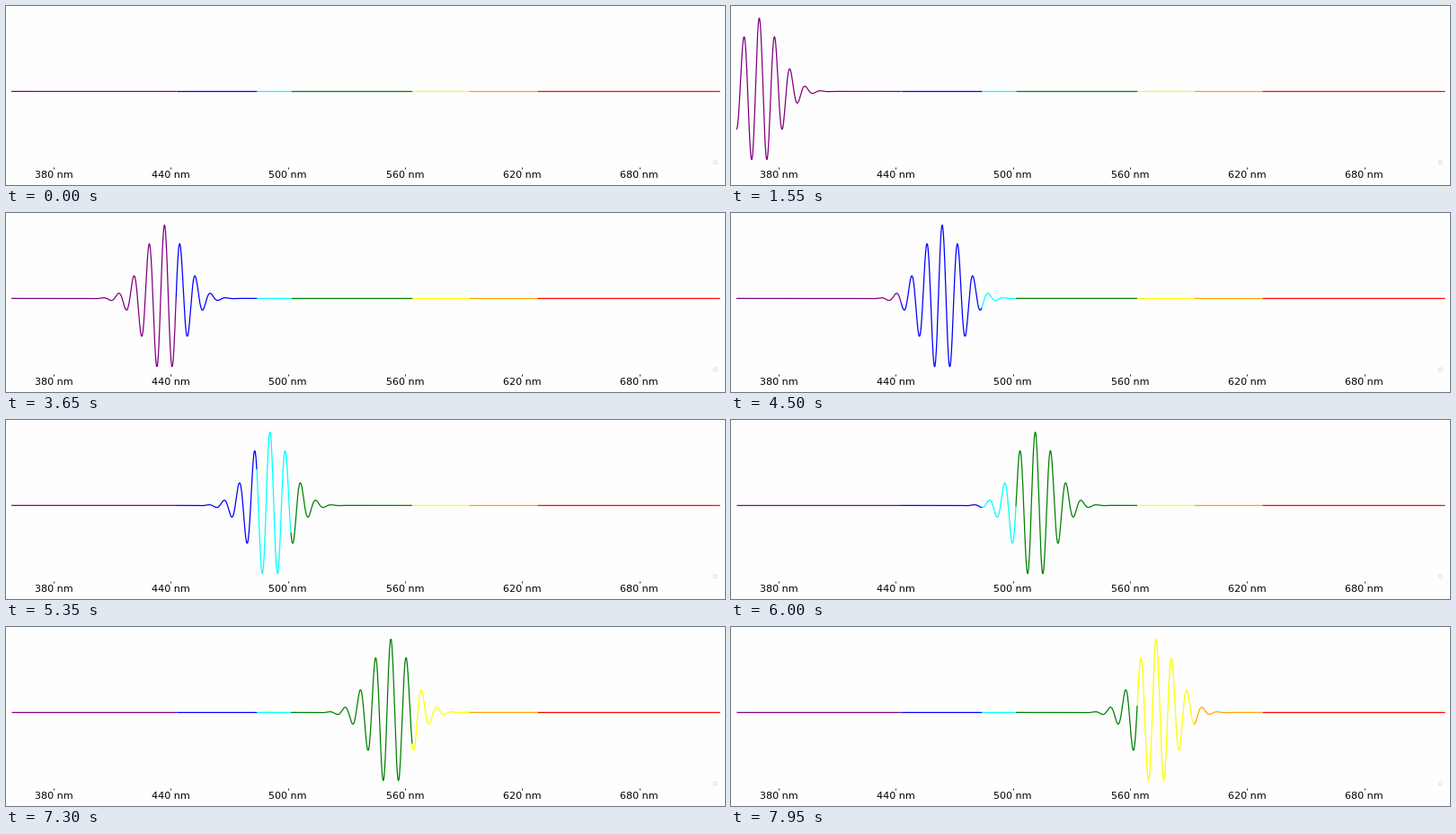
These frames come from a looping animation (800x200 px, 8 s). A matplotlib script:

```python
import numpy as np
import matplotlib.pyplot as plt
from matplotlib.animation import FuncAnimation
from matplotlib.patches import FancyBboxPatch

W, H, DPI = 800, 200, 100
FRAMES, INTERVAL = 160, 50

BASE, AMP = 95.45, 82.0       # rest line and peak height, px
PERIOD, SIGMA = 17.15, 22.2   # carrier period and envelope width, px
START, SPEED = -75.5, 3.45    # packet centre at time zero, px per frame

BANDS = [
    ("purple", 6, 189.2),
    ("blue", 189.2, 279),
    ("cyan", 279, 317),
    ("green", 317, 452),
    ("yellow", 452, 515),
    ("orange", 515, 591),
    ("red", 591, 794),
]


def packet(x, frame):
    d = x - (START + SPEED * frame)
    return BASE - AMP * np.exp(-d**2 / (2 * SIGMA**2)) * np.cos(2 * np.pi * d / PERIOD)


fig = plt.figure(figsize=(W / DPI, H / DPI), dpi=DPI, facecolor="#fefefe")
ax = fig.add_axes([0, 0, 1, 1])
ax.set_xlim(0, W)
ax.set_ylim(H, 0)
ax.axis("off")

for i in range(6):
    x = 53.1 + 130.3 * i
    ax.plot([x, x], [179.5, 182.3], color="black", lw=0.6, solid_capstyle="butt")
    ax.text(x, 192, f"{380 + 60 * i} nm", fontsize=8, family="DejaVu Sans",
            ha="center", va="baseline")

# empty legend frame
ax.add_patch(FancyBboxPatch((787.5, 173), 3.6, 3.6,
                            boxstyle="round,pad=0,rounding_size=0.8",
                            fc="white", ec="#dddddd", lw=0.7))

waves = []
for color, x0, x1 in BANDS:
    xs = np.linspace(x0, x1, int((x1 - x0) / 0.4) + 1)
    line, = ax.plot(xs, packet(xs, 0), color=color, lw=0.9, solid_capstyle="butt")
    waves.append((line, xs))


def update(frame):
    for line, xs in waves:
        line.set_ydata(packet(xs, frame))
    return [line for line, _ in waves]


anim = FuncAnimation(fig, update, frames=FRAMES, interval=INTERVAL,
                     repeat=True, repeat_delay=0, blit=False)
plt.show()
```
